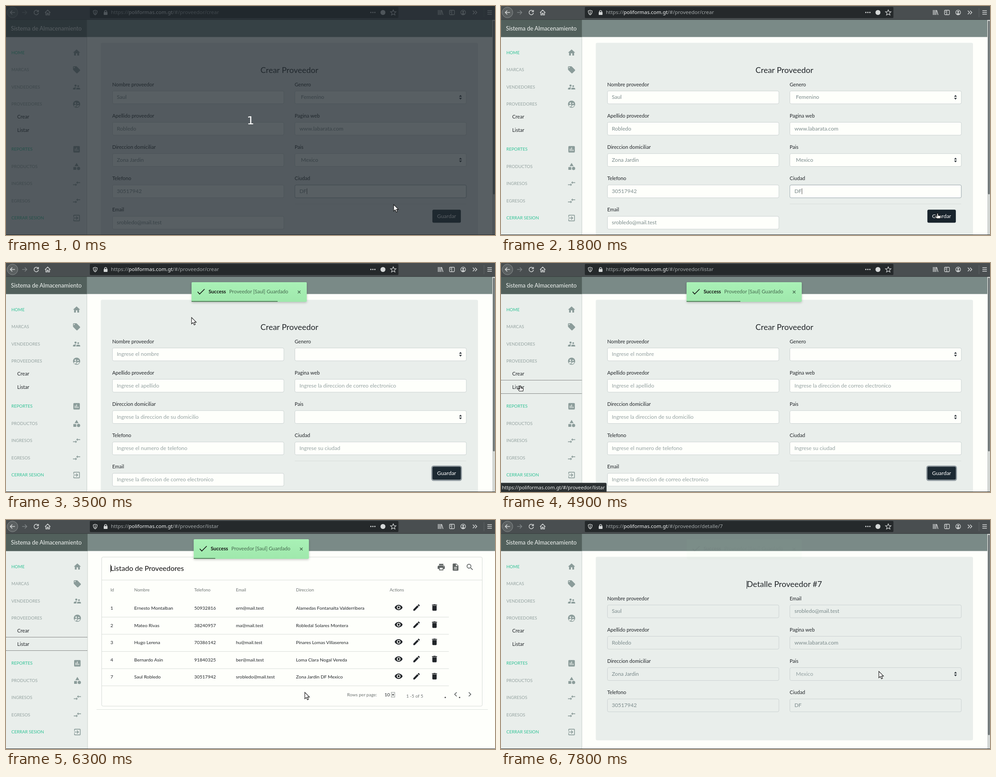
These frames come from a looping animation (1091 px wide and 513 px high, 8000 ms). An HTML page:

```html
<!DOCTYPE html>
<html lang="es">
<head>
<meta charset="utf-8">
<title>Sistema de Almacenamiento</title>
<style>
html, body { margin: 0; width: 100%; height: 100%; overflow: hidden; background: #fefffb; }
svg { display: block; width: 1091px; height: 513px; font-family: Lato, sans-serif; white-space: pre; }
.ui { font-family: "Noto Sans", "Open Sans", sans-serif; }
</style>
</head>
<body>
<svg id="stage" viewBox="0 0 1091 513"></svg>
<script>
const LOOP = 8000, STEP = 100;
const INK = '#212529', PAGE = '#fefffb', PANEL = '#e9eeeb', GREEN = '#2fc295';
const GREY = '#95a3a1', VALUE = '#7b8a8b', HINT = '#95a2a2', EDGE = '#cbd2d2', LIGHT = '#d5d8d8';

const ICONS = {
  home: 'M10 20v-6h4v6h5v-8h3L12 3 2 12h3v8z',
  tag: 'M21.4 11.6l-9-9Q11.8 2 11 2H4Q2 2 2 4v7q0 .8.6 1.4l9 9q1.4 1.2 2.8 0l7-7q1.2-1.4 0-2.8zM5.5 7a1.5 1.5 0 1 1 0-3 1.5 1.5 0 0 1 0 3z',
  people: 'M16.5 12a2.5 2.5 0 1 0 0-5 2.5 2.5 0 0 0 0 5zM9 11a3 3 0 1 0 0-6 3 3 0 0 0 0 6zm7.5 3c-1.8 0-5.5.9-5.5 2.8V19h11v-2.2c0-1.9-3.7-2.8-5.5-2.8zM9 13c-2.3 0-7 1.2-7 3.5V19h7v-2.2c0-.9.3-2.4 2.4-3.5Q10 13 9 13z',
  chart: 'M19 3H5Q3 3 3 5v14q0 2 2 2h14q2 0 2-2V5q0-2-2-2zM9 17H7v-7h2zm4 0h-2V7h2zm4 0h-2v-4h2z',
  shapes: 'M12 2l-5.5 9h11zM3 13.5h8v8H3zM17.5 13a4.5 4.5 0 1 1 0 9 4.5 4.5 0 0 1 0-9z',
  swap: 'M9 14H2v2h7v3l4-4-4-4zm6-1v-3h7V8h-7V5l-4 4z',
  exit: 'M10.1 15.6L11.5 17l5-5-5-5-1.4 1.4 2.6 2.6H3v2h9.7zM19 3H5Q3 3 3 5v4h2V5h14v14H5v-4H3v4q0 2 2 2h14q2 0 2-2V5q0-2-2-2z',
  eye: 'M12 4.5C7 4.5 2.7 7.6 1 12c1.7 4.4 6 7.5 11 7.5s9.3-3.1 11-7.5c-1.7-4.4-6-7.5-11-7.5zM12 17a5 5 0 1 1 0-10 5 5 0 0 1 0 10zm0-8a3 3 0 1 0 0 6 3 3 0 0 0 0-6z',
  pencil: 'M3 17.2V21h3.8L17.8 9.9l-3.7-3.7zM20.7 7q.6-.7 0-1.4l-2.3-2.3q-.7-.6-1.4 0l-1.9 1.8 3.8 3.8z',
  bin: 'M6 19q0 2 2 2h8q2 0 2-2V7H6zM19 4h-3.5l-1-1h-5l-1 1H5v2h14z',
  print: 'M19 8H5q-3 0-3 3v6h4v4h12v-4h4v-6q0-3-3-3zm-3 11H8v-5h8zm3-7a1 1 0 1 1 0-2 1 1 0 0 1 0 2zM18 3H6v4h12z',
  doc: 'M14 2H6Q4 2 4 4v16q0 2 2 2h12q2 0 2-2V8zm2 16H8v-2h8zm0-4H8v-2h8zm-3-5V3.5L18.5 9z',
  search: 'M15.5 14h-.8l-.3-.3a6.5 6.5 0 1 0-.7.7l.3.3v.8l5 5 1.5-1.5zm-6 0a4.5 4.5 0 1 1 0-9 4.5 4.5 0 0 1 0 9z'
};

const rect = (x, y, w, h, fill, more = '') =>
  `<rect x="${x}" y="${y}" width="${w}" height="${h}" fill="${fill}" ${more}/>`;
const line = (d, color, w = 1, more = '') =>
  `<path d="${d}" fill="none" stroke="${color}" stroke-width="${w}" ${more}/>`;
const dot = (x, y, r, fill, more = '') => `<circle cx="${x}" cy="${y}" r="${r}" fill="${fill}" ${more}/>`;
// y is the middle of the capital letters
const text = (x, y, s, size, fill, more = '') =>
  `<text x="${x}" y="${y + size * 0.36}" font-size="${size}" fill="${fill}" ${more}>${s}</text>`;
const icon = (name, x, y, fill, size = 19.2) =>
  `<path d="${ICONS[name]}" fill="${fill}" transform="translate(${x - size / 2} ${y - size / 2}) scale(${size / 24})"/>`;
const group = (id, body, more = '') => `<g id="${id}" ${more}>${body}</g>`;

function toolbar() {
  const stroke = (d, w = 1.5, c = LIGHT) => line(d, c, w);
  return rect(0, 0, 1091, 31, '#494e50') + rect(0, 30, 1091, 1, '#383d3e')
    + dot(14.5, 14.5, 11.8, '#5b6061', 'stroke="#8b9091"')
    + stroke('M20 14.5H9.500M14 10L9.500 14.500 14 19')
    + stroke('M36 14.500H46M42 10L46.500 14.500 42 19', 1.5, '#7e8384')
    + stroke('M71.500 11.500A5 5 0 1 0 72.500 15.500M72.500 9V12.800H68.500')
    + stroke('M87 15L93 9 99 15M89 14V20H91.800V16H94.200V20H97V14')
    + rect(187, 2, 688.5, 25, '#25292b', 'rx="2"')
    + stroke('M199 9.500L203.300 11C203.500 15 202 18 199 20 196 18 194.500 15 194.700 11ZM199 11.500V18', 1.3)
    + rect(218, 13.5, 8.5, 6.5, LIGHT, 'rx="1"') + stroke('M219.800 14V12A2.500 2.500 0 0 1 224.700 12V14')
    + `<text class="ui" x="234" y="18.3" font-size="11.45" fill="#a3a8a9">https://<tspan fill="#f4f6f6">poliformas.com.gt</tspan><tspan id="path"></tspan></text>`
    + [814, 818.5, 823].map(x => dot(x, 14.5, 1.4, LIGHT)).join('')
    + dot(841, 14.5, 5.5, LIGHT)
    + stroke('M864 8.500L865.800 12.700 870.200 13 866.800 15.900 867.900 20.200 864 17.900 860.100 20.200 861.200 15.900 857.800 13 862.200 12.700Z', 1.2)
    + stroke('M964.500 9V20M967.500 9V20M970.500 9V20M972 9.500L975 20')
    + '<rect x="989.500" y="9.500" width="11" height="10" rx="1.500" fill="none" stroke="#d5d8d8" stroke-width="1.300"/>'
    + stroke('M994.500 10V19M991 12H993M991 14.500H993', 1.2)
    + dot(1020, 14.5, 5.3, 'none', `stroke="${LIGHT}" stroke-width="1.3"`) + dot(1020, 13, 2, LIGHT)
    + '<path d="M1016.500 17.500Q1020 14 1023.500 17.500Q1020 20.500 1016.500 17.500" fill="#d5d8d8"/>'
    + stroke('M1041.500 10.500L1045.500 14.500 1041.500 18.500M1046.500 10.500L1050.500 14.500 1046.500 18.500')
    + rect(1066, 5, 1, 20, '#5f6465')
    + stroke('M1074 10.500H1084M1074 14.500H1084M1074 18.500H1084');
}

const MENU = [
  ['HOME', 104.5, 'home', 1], ['MARCAS', 143, 'tag'], ['VENDEDORES', 181.5, 'people'], ['PROVEEDORES', 220],
  ['REPORTES', 321, 'chart', 1], ['PRODUCTOS', 359.5, 'shapes'], ['INGRESOS', 398, 'swap'],
  ['EGRESOS', 436.5, 'swap'], ['CERRAR SESION', 475, 'exit', 1]
];

function sidebar() {
  const crew = dot(157.5, 220, 8, '#8b9c9a') + dot(154.8, 217.8, 1.9, PANEL) + dot(160.6, 218.3, 1.5, PANEL)
    + `<path d="M150.800 223.500Q154.800 219.800 157.800 221.800 155.200 223 155.200 226.300 152.500 226 150.800 223.500ZM157 226.500V224.500Q160.500 220.500 164 223 161.800 226.500 157 226.500Z" fill="${PANEL}"/>`;
  return `<rect id="sideBg" y="69" height="443" fill="${PANEL}"/><rect id="sideEdge" y="69" width="1" height="443" fill="#c9cfcc"/>`
    + rect(0, 31, 1091, 38.5, '#7a8a87') + '<rect id="brand" y="31" height="38.500" fill="#52605c"/>'
    + text(11, 50, 'Sistema de Almacenamiento', 12.8, '#f3f6f4')
    + MENU.map(([s, y, , on]) => text(12, y, s, 9.6, on ? GREEN : GREY)).join('')
    + text(25, 247.5, 'Crear', 11.2, INK) + text(25, 277.5, 'Listar', 11.2, INK)
    + group('menuIcons', crew + MENU.filter(m => m[2]).map(m => icon(m[2], 157.5, m[1], '#8b9c9a')).join(''))
    + `<path id="focusLines" fill="none" stroke="#222" stroke-dasharray="1 1"/>`;
}

const rowY = i => 190.3 + 70.2 * i;

function field(col, i, label, select, fill) {
  const x = col ? 644.5 : 237.5, y = rowY(i);
  return text(x - 0.5, y - 14.8, label, 11.2, INK)
    + rect(x, y, 382.5, 28.8, fill, `rx="3" stroke="${EDGE}"`)
    + (select ? `<path d="M1010.800 ${y + 13}h6.400l-3.200-4zM1010.800 ${y + 15.500}h6.400l-3.200 4z" fill="#343a40"/>` : '');
}
const entry = (col, i, s, color, select) =>
  text(select ? 658 : col ? 654.7 : 247.2, rowY(i) + 13.7, s, 12, color);

const LEFT = ['Nombre proveedor', 'Apellido proveedor', 'Direccion domiciliar', 'Telefono', 'Email'];
const RIGHT = ['Pagina web', 'Pais', 'Ciudad'];
const PERSON = ['Saul', 'Robledo', 'Zona Jardin', '30517942', 'srobledo@mail.test'];
const WEB = ['www.labarata.com', 'Mexico', 'DF'];

const scrollbar = end => rect(1085, 31, 6, 481, '#d3d7d4') + rect(1086.5, 33, 4, end - 33, '#697071', 'rx="2"');
const fields = (n, first, fill) => LEFT.slice(0, n).map((s, i) => field(0, i, s, false, fill)).join('')
  + [first, ...RIGHT].map((s, i) => field(1, i, s, i === 2 || s === 'Genero', fill)).join('');
const entries = (n, first, select, pale) => PERSON.slice(0, n).map((s, i) => entry(0, i, s, VALUE)).join('')
  + entry(1, 0, first, VALUE, select)
  + WEB.map((s, i) => entry(1, i + 1, s, i === 1 ? pale : VALUE, i === 1)).join('');

function form() {
  const hints = ['el nombre', 'el apellido', 'la direccion de su domicilio', 'el numero de telefono', 'la direccion de correo electronico'];
  return rect(211.5, 82.5, 841.5, 440, PANEL, 'rx="3"')
    + text(632.3, 144, 'Crear Proveedor', 18, INK, 'text-anchor="middle"')
    + fields(5, 'Genero', PAGE)
    + rect(644.5, 443, 382.5, 1, '#d9dedb')
    + group('filled', entries(5, 'Femenino', true, VALUE))
    + group('empty', hints.map((s, i) => entry(0, i, 'Ingrese ' + s, HINT)).join('')
      + entry(1, 1, 'Ingrese ' + hints[4], HINT) + entry(1, 3, 'Ingrese su ciudad', HINT))
    + group('cityFocus', rect(644.5, rowY(3), 382.5, 28.8, 'none', 'rx="3" stroke="#a3b0b6"') + rect(671, 408.5, 1, 13, '#555'))
    + group('ring', rect(950, 455, 66, 32, 'none', 'rx="4" stroke="#8f999f" stroke-width="2.400"'))
    + `<rect id="button" x="951.300" y="456.300" width="63.500" height="29.200" rx="3"/>`
    + text(983, 470.5, 'Guardar', 12, '#fff', 'text-anchor="middle"')
    + scrollbar(422);
}

function detail() {
  return rect(211.5, 82.5, 841.5, 411, PANEL, 'rx="3"')
    + text(632.3, 144, 'Detalle Proveedor #7', 18, INK, 'text-anchor="middle"')
    + rect(548, 136, 1, 18, INK)
    + fields(4, 'Email', PANEL) + entries(4, PERSON[4], false, HINT)
    + scrollbar(482);
}

const COLS = [233, 286, 420, 513, 647];
const ROWS = [
  [1, 'Ernesto Montalban', '50932816', 'ern@mail.test', 'Alamedas Fontanalta Valderribera'],
  [2, 'Mateo Rivas', '38240957', 'ma@mail.test', 'Robledal Solares Montera'],
  [3, 'Hugo Lerena', '70386142', 'hu@mail.test', 'Pinares Lomas Villaserena'],
  [4, 'Bernardo Asin', '91840325', 'ber@mail.test', 'Loma Clara Nogal Vereda'],
  [7, 'Saul Robledo', PERSON[3], PERSON[4], 'Zona Jardin DF Mexico']
];
const ROW_TOP = 179, ROW_H = 38.5;

function list() {
  const heads = ['Id', 'Nombre', 'Telefono', 'Email', 'Direccion'];
  const row = (r, i) => {
    const y = 197.5 + i * ROW_H;
    return r.map((s, c) => text(COLS[c], y, s, 10.4, INK)).join('')
      + ['eye', 'pencil', 'bin'].map((n, c) => icon(n, 876 + 40 * c, y - 1.5, INK)).join('')
      + rect(214, ROW_TOP - 0.5 + (i + 1) * ROW_H, 774, 1, '#dadeda');
  };
  return rect(213.5, 83, 849, 334, PAGE, 'rx="3" stroke="#d6dad7"')
    + text(233, 108, 'Listado de Proveedores', 16, '#111') + rect(233, 100, 1, 17, '#111')
    + ['print', 'doc', 'search'].map((n, i) => icon(n, 971 + 32 * i, 105.5, '#5e6362')).join('')
    + rect(214, 134, 848, 1, '#dadeda')
    + heads.map((s, i) => text(COLS[i], 157, s, 9.6, '#6e7473')).join('') + text(856, 157, 'Actions', 9.6, '#6e7473')
    + `<rect id="hover" x="214" width="774" height="${ROW_H - 0.5}" fill="#ebece8"/>`
    + ROWS.map(row).join('')
    + text(761, 391, 'Rows per page:', 10, '#6e7473') + text(844.5, 391, '10', 10.4, INK)
    + rect(859.5, 386, 8, 11, '#eceeec', 'stroke="#9ba09e"') + '<path d="M861.300 390.500h4.400l-2.200 2.800z" fill="#111"/>'
    + text(893, 394, '1 -5 of 5', 10, '#6e7473')
    + dot(980, 397.5, 1.5, '#444') + dot(1012, 397.5, 1.5, '#444')
    + line('M1005.500 386L1001 390.500 1005.500 395M1032.500 386L1037 390.500 1032.500 395', '#555b5a', 1.6)
    + rect(202, 424, 873, 1, '#dde1de');
}

function toast() {
  return rect(414, 43, 257, 44, 'url(#mint)', 'rx="2" filter="url(#shadow)"')
    + line('M427.500 64.500L432 69.500 443 58.500', '#111', 1.7)
    + text(452, 63.5, 'Success', 11.2, '#111', 'font-weight="700"')
    + text(498, 63.5, 'Proveedor [Saul] Guardado', 11.2, '#45694e')
    + line('M651 62L657 68M657 62L651 68', '#3f6148', 1.1)
    + '<rect id="progress" x="414" y="85" height="2" fill="#57875f"/>';
}

document.getElementById('stage').innerHTML =
  `<defs>
    <linearGradient id="mint" x2="0" y2="1"><stop stop-color="#a9f1b6"/><stop offset="1" stop-color="#9fe8ac"/></linearGradient>
    <filter id="shadow" x="-10%" y="-30%" width="120%" height="170%"><feDropShadow dx="0" dy="2" stdDeviation="2.500" flood-opacity=".22"/></filter>
  </defs>`
  + rect(0, 0, 1091, 513, PAGE) + sidebar() + toolbar()
  + group('form', form()) + group('list', list()) + group('detail', detail())
  + group('toast', toast())
  + rect(0, 512, 1091, 1, '#25292a')
  + group('status', '<path id="statusBg" fill="#2b3032"/><text id="statusText" class="ui" x="2" y="507" font-size="10.950" fill="#eef0f0"></text>')
  + group('countdown', rect(0, 0, 1091, 513, '#20282f', 'opacity=".74"')
    + '<text x="545.500" y="265" font-size="25.500" fill="#fff" text-anchor="middle" font-family="DejaVu Sans, sans-serif">1</text>')
  + group('arrow', '<path d="M0 0V14.500L3.400 11.400 5.800 16.700 8.300 15.600 6 10.600H10.500Z" fill="#fff" stroke="#111" stroke-width="1.100"/>')
  + group('hand', '<path d="M-1.400 1Q0-.8 1.300 1V5L5.500 5.600Q7 6 6.800 7.500L6 12H-2L-5.400 7.600Q-5.600 5.800-3.600 6.400L-1.400 8Z" fill="#fff" stroke="#111" stroke-width="1.100"/>');

const el = {};
document.querySelectorAll('#stage [id]').forEach(n => el[n.id] = n);
const show = (id, on) => el[id].setAttribute('display', on ? 'inline' : 'none');
const set = (id, attrs) => { for (const k in attrs) el[id].setAttribute(k, attrs[k]); };
const clamp = v => Math.max(0, Math.min(1, v));

// time, x, y of the pointer tip
const POINTER = [
  [0, 865, 445], [700, 865, 445], [1200, 974, 464], [2300, 974, 464], [2600, 925, 436], [3100, 640, 268],
  [3500, 414, 122], [4400, 61, 256], [4700, 43, 275], [5200, 43, 275], [5300, 82, 296], [5600, 336, 323],
  [6200, 640, 390], [6800, 800, 366], [7200, 872, 351], [7500, 872, 351], [7800, 843, 339], [LOOP, 843, 339]
];

function pointerAt(t) {
  const i = POINTER.findIndex(p => p[0] > t), a = POINTER[i - 1], b = POINTER[i];
  const k = (t - a[0]) / (b[0] - a[0]);
  return [a[1] + (b[1] - a[1]) * k, a[2] + (b[2] - a[2]) * k];
}

function draw(t) {
  const page = t < 5000 ? 'form' : t < 7600 ? 'list' : 'detail';
  const onList = page === 'list';
  ['form', 'list', 'detail'].forEach(id => show(id, id === page));
  show('countdown', t < 100);

  const side = onList ? 182 : 180.5;
  set('sideBg', { width: side });
  set('brand', { width: side });
  set('sideEdge', { x: side - 0.5 });
  set('menuIcons', { transform: `translate(${onList ? 1.7 : 0})` });
  set('focusLines', { d: `M0 262.500H${side}M0 292.500H${side}` });
  show('focusLines', t >= 4700 && t < 7600);
  el.path.textContent = '/#/proveedor/' + (t < 4700 ? 'crear' : t < 7600 ? 'listar' : 'detalle/7');

  const [x, y] = pointerAt(t);
  const onButton = page === 'form' && x > 951 && x < 1015 && y > 456;
  const onLink = x < side && y > 263 && y < 293;
  const row = onList && x > 214 && x < 988 ? Math.floor((y - ROW_TOP) / ROW_H) : -1;
  const onRow = row >= 0 && row < ROWS.length;
  const hand = onButton || onLink || onRow;
  show('hand', hand);
  show('arrow', !hand);
  set(hand ? 'hand' : 'arrow', { transform: `translate(${x} ${y})` });
  show('hover', onRow);
  if (onRow) set('hover', { y: ROW_TOP + row * ROW_H });

  show('filled', t < 2200);
  show('empty', t >= 2200);
  show('cityFocus', t < 2100);
  show('ring', t >= 2100);
  set('button', { fill: onButton ? '#18232c' : '#1c2932' });

  const fade = t < 5000 ? clamp((t - 2235) / 500) : clamp(1 - (t - 7200) / 620);
  show('toast', fade > 0);
  set('toast', { opacity: fade, transform: `translate(${onList ? 4.8 : 0})` });
  set('progress', { width: 257 * clamp((7235 - t) / 5000) });

  const onEye = t >= 7200 && t < 7600;
  show('status', onEye || (t >= 4600 && t < 5300));
  el.statusText.textContent = 'https://poliformas.com.gt/#/proveedor/' + (onEye ? 'detalle/7' : 'listar');
  set('statusBg', { d: `M0 492.500H${onEye ? 254 : 233}q2.500 0 2.500 2.500V513H0Z` });
}

let start;
function tick(now) {
  start ??= now;
  draw(Math.floor(((now - start) % LOOP) / STEP) * STEP);
  requestAnimationFrame(tick);
}
draw(0);
requestAnimationFrame(tick);
</script>
</body>
</html>
```
